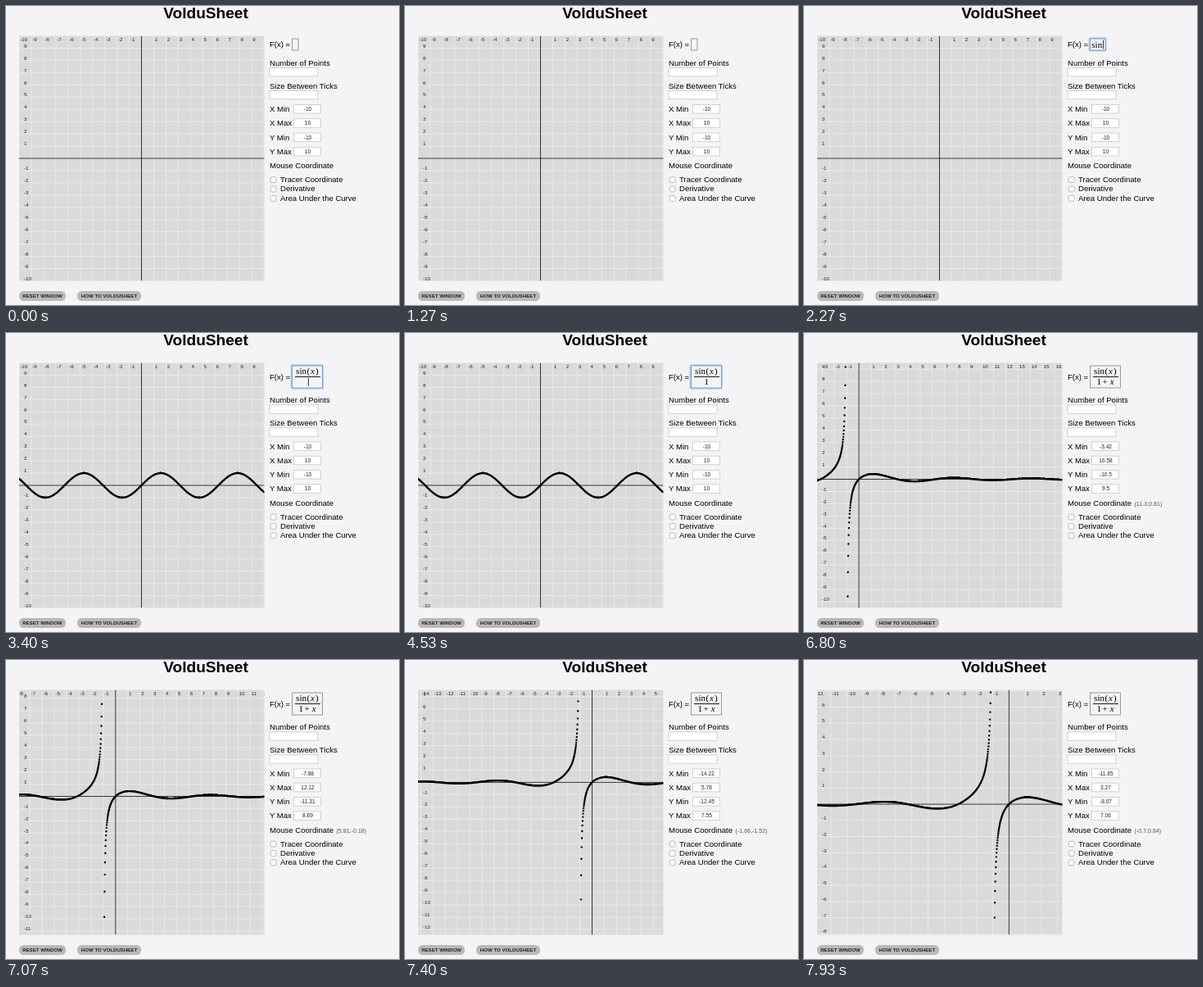
Write an HTML page that moves like this. It is 480 px wide and 365 px high and loops after 8 s.

```html
<!DOCTYPE html>
<html lang="en">
<head>
<meta charset="utf-8">
<style>
html, body { margin: 0; width: 100%; height: 100%; overflow: hidden; background: #f4f3f6; }
svg { display: block; font: 9.55px "Liberation Sans", Arial, sans-serif; fill: #000; }
.title { font-weight: bold; font-size: 19.1px; text-anchor: middle; }
.button { font-weight: bold; font-size: 6.1px; text-anchor: middle; fill: #222; }
.value { font-size: 6.6px; text-anchor: middle; fill: #222; }
.tick { font-size: 6.2px; fill: #222; }
.mouse { font-size: 7.1px; fill: #555; }
.math { font: 11px "Liberation Serif", Times, serif; }
.var { font-style: italic; }
.input { fill: #fff; stroke: #c9c8cc; stroke-width: .8; }
.grid { stroke: #e9e8ea; }
.axis { stroke: #333; }
.curve { fill: none; stroke: #000; stroke-width: 2.4; stroke-linecap: round; }
</style>
</head>
<body>
<svg width="480" height="365" viewBox="0 0 480 365">
  <text class="title" x="244" y="14.5">VolduSheet</text>
  <rect x="16" y="36.5" width="299.5" height="299" fill="#dad9dc"/>
  <clipPath id="frame"><rect x="16" y="36.5" width="299.5" height="299"/></clipPath>
  <g id="plot" clip-path="url(#frame)"></g>
  <g id="formula"></g>
  <g id="panel"></g>
  <g fill="#b9b8ba">
    <rect x="16" y="348" width="57" height="12" rx="5.5"/>
    <rect x="87" y="348" width="78" height="12" rx="5.5"/>
  </g>
  <text class="button" x="44.5" y="356.2">RESET WINDOW</text>
  <text class="button" x="126" y="356.2">HOW TO VOLDUSHEET</text>
</svg>
<script>
const LOOP = 8000, STEP = 200 / 3;
const LEFT = 16, TOP = 36.5, SIZE = 299;
const FOCUS = 1470, BLUR = 6070, MOUSE = 5800;
// times at which each key of sin(x)/1+x is pressed
const KEYS = [1870, 2000, 2130, 2470, 2670, 2870, 3400, 3930, 4670, 4870];
// time, centre x, centre y, visible range
const VIEW = [[5930, 0, 0, 20], [6200, -.034, 0, 20], [6800, 6.583, -.5, 20],
  [7400, -4.217, -2.45, 20], [7533, -4.292, -.505, 20], [7933, -4.292, -.505, 15.124]];
// time, pointer x, pointer y
const POINTER = [[5800, 1.6, 1.2], [6130, 1.02, .48], [6200, 1.02, .48], [6800, 11.3, .81],
  [7400, -1.66, -1.53], [7533, -.7, .84]];

const byId = id => document.getElementById(id);
const text = (x, y, s, cls = '') => `<text class="${cls}" x="${x}" y="${y}">${s}</text>`;
const rect = (x, y, w, h, attrs) => `<rect x="${x}" y="${y}" width="${w}" height="${h}" ${attrs}/>`;
const line = (x1, y1, x2, y2, cls) => `<path class="${cls}" d="M${x1} ${y1}L${x2} ${y2}"/>`;
const short = v => String(+v.toFixed(2));

function track(keys, t) {
  const next = keys.findIndex(k => k[0] > t);
  if (next < 0) return keys[keys.length - 1].slice(1);
  if (next === 0) return keys[0].slice(1);
  const a = keys[next - 1], b = keys[next];
  const u = (1 - Math.cos(Math.PI * (t - a[0]) / (b[0] - a[0]))) / 2;
  return a.slice(1).map((v, i) => v + (b[i + 1] - v) * u);
}

function drawPlot(xMin, yMin, range, typed) {
  const scale = SIZE / range, right = LEFT + SIZE + .5, bottom = TOP + SIZE;
  const px = x => LEFT + (x - xMin) * scale;
  const py = y => bottom - (y - yMin) * scale;
  let grid = '', labels = '';
  for (let i = Math.floor(xMin); i <= xMin + range; i++) {
    grid += line(px(i), TOP, px(i), bottom, 'grid');
    if (i) labels += text(px(i) + 1.3, 42.7, i, 'tick');
  }
  for (let i = Math.floor(yMin); i <= yMin + range; i++) {
    grid += line(LEFT, py(i), right, py(i), 'grid');
    if (i) labels += text(22, py(i) - .8, i, 'tick');
  }
  const axes = line(px(0), TOP, px(0), bottom, 'axis') + line(LEFT, py(0), right, py(0), 'axis');
  let dots = '';
  if (typed >= 5) for (let k = 0; k <= 1000; k++) {
    const x = xMin + k * range / 1000;
    const y = Math.sin(x) / (typed === 10 ? 1 + x : 1);
    if (Math.abs(y) < 30) dots += `M${px(x).toFixed(2)} ${py(y).toFixed(2)}h0`;
  }
  byId('plot').innerHTML = grid + axes + labels + `<path class="curve" d="${dots}"/>`;
}

const glyphs = (s, offsets, x, y) => [...s].map((c, i) =>
  text(x + offsets[i], y, c, c === 'x' ? 'math var' : 'math')).join('');

function drawFormula(typed, t) {
  const fraction = typed >= 7, focused = t >= FOCUS && t < BLUR;
  const top = 'sin(x)'.slice(0, typed), below = '1+x'.slice(0, Math.max(0, typed - 7));
  const topEnd = [0, 4.4, 7.5, 13, 17.5, 23.3, 28][top.length];
  const belowWidth = [0, 5.5, 14, 21.5][below.length];
  const w = fraction ? 37 : Math.max(7.5, topEnd + 5.5), h = fraction ? 27 : 14;
  const belowX = 368.3 - belowWidth / 2;
  let out = text(322, fraction ? 56.5 : 50.2, 'F(x) =');
  if (focused) out += rect(349, 39.7, w + .5, h + .3, 'rx="1" fill="none" stroke="#a9cbe9" stroke-width="3"');
  out += rect(349.5, 40, w, h, `fill="#f4f3f6" stroke="${focused ? '#6c9fcc' : '#8f8f92'}" stroke-width=".9"`);
  out += glyphs(top, [0, 4.4, 7.5, 13.6, 18, 24], fraction ? 354 : 351.2, fraction ? 50.3 : 50.5);
  if (fraction) out += rect(353, 53.1, 31, .9, '') + glyphs(below, [0, 7, 16.3], belowX, 62.8);
  const lastKey = typed ? KEYS[typed - 1] : FOCUS;
  if (focused && Math.floor((t - lastKey) / 500) % 2 === 0)
    out += fraction ? rect(belowX + belowWidth + .6, 55, .8, 9.5, '')
      : rect(352 + topEnd, 41.8, .8, 10.5, '');
  byId('formula').innerHTML = out;
}

function drawPanel(xMin, yMin, range, shift, t) {
  let out = '';
  ['Number of Points', 'Size Between Ticks'].forEach((name, i) => {
    out += text(322, 72.6 + 28 * i, name) + rect(322, 75.4 + 28 * i, 59, 10.4, 'class="input"');
  });
  const limits = { 'X Min': xMin, 'X Max': xMin + range, 'Y Min': yMin, 'Y Max': yMin + range };
  Object.entries(limits).forEach(([name, v], i) => {
    const y = 129 + 17.3 * i;
    out += text(322, y, name) + rect(351.5, y - 8.6, 33, 10.6, 'class="input"')
      + text(368.5, y - 1, short(v), 'value');
  });
  out += text(322, 198.2, 'Mouse Coordinate');
  if (t >= MOUSE) out += text(403.5, 198.2, `(${track(POINTER, t).map(short)})`, 'mouse');
  ['Tracer Coordinate', 'Derivative', 'Area Under the Curve'].forEach((name, i) => {
    const y = 215 + 11.4 * i;
    out += rect(323.2, y - 6.3, 6.8, 6.8, 'rx="1.4" fill="#fff" stroke="#aaa9ac" stroke-width=".8"')
      + text(335, y, name);
  });
  byId('panel').setAttribute('transform', `translate(0 ${shift})`);
  byId('panel').innerHTML = out;
}

let shown = -1;
function render(now) {
  requestAnimationFrame(render);
  const step = Math.floor((now % LOOP + 5) / STEP);
  if (step === shown) return;
  shown = step;
  const t = step * STEP + 4;
  const typed = KEYS.filter(k => k <= t).length;
  const [cx, cy, range] = track(VIEW, t - 4);
  const xMin = cx - range / 2, yMin = cy - range / 2;
  drawPlot(xMin, yMin, range, typed);
  drawFormula(typed, t);
  drawPanel(xMin, yMin, range, typed >= 7 ? 12.5 : 0, t);
}
render(performance.now());
</script>
</body>
</html>
```
